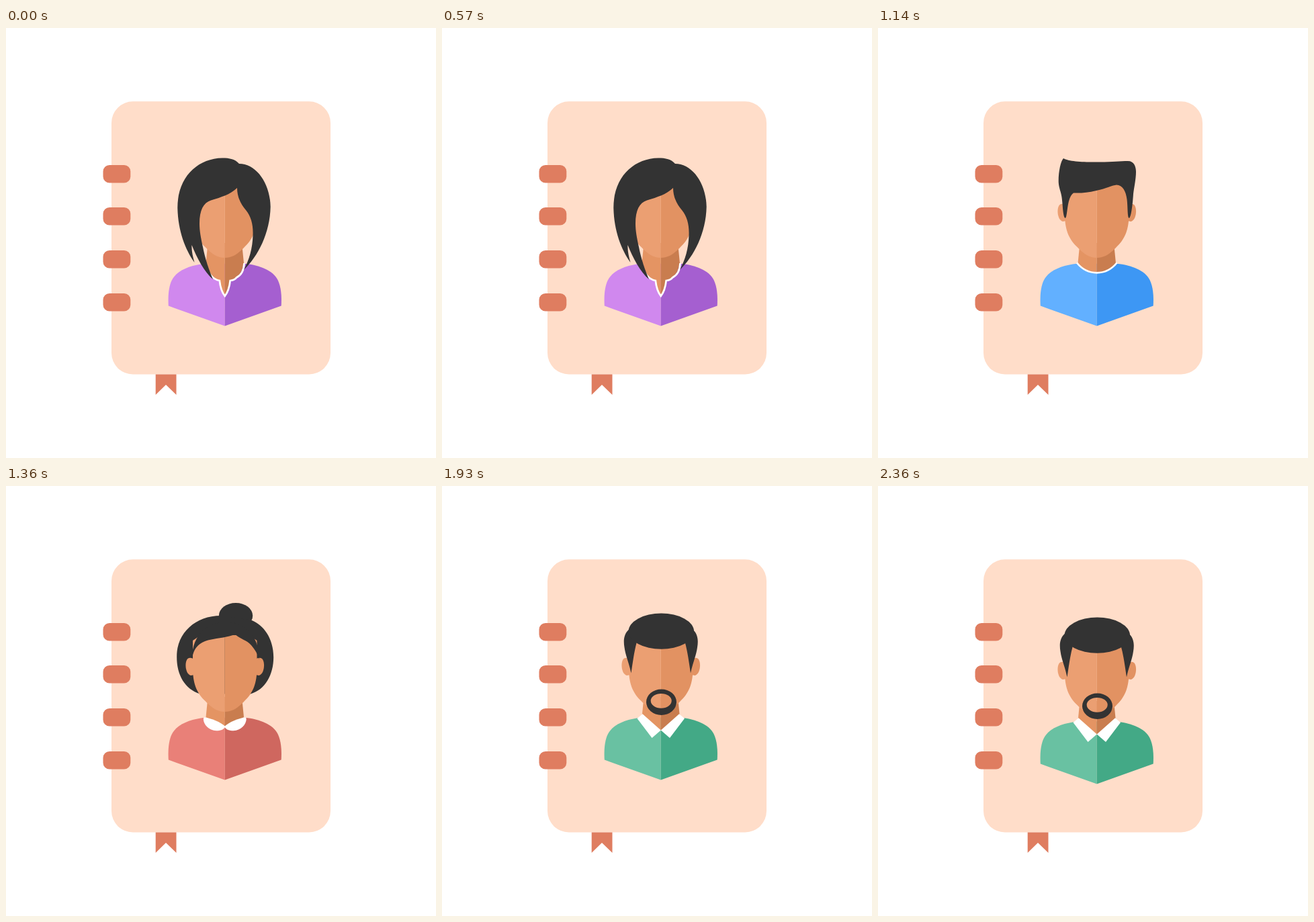
These frames come from a looping animation (640 by 640 pixels, 2.43 s). An HTML page:

```html
<!DOCTYPE html>
<html lang="en">
<head>
<meta charset="utf-8">
<title>Address book</title>
<style>
  html, body { margin: 0; width: 100%; height: 100%; overflow: hidden; background: #fff; }
  svg { display: block; width: 100%; height: 100%; }
</style>
</head>
<body>
<svg id="stage" viewBox="0 0 640 640"></svg>
<script>
const HAIR = '#333', ACCENT = '#df7d60';
const AXIS = 325.75;

const path = (d, fill, extra = '') => `<path d="${d}" fill="${fill}" ${extra}/>`;
const line = d => path(d, 'none', 'stroke="#fff" stroke-width="2.7" stroke-linecap="butt"');
const oval = (x, y, rx, ry, fill) =>
  `<ellipse cx="${x}" cy="${y}" rx="${rx}" ry="${ry}" fill="${fill}"/>`;

// A left half and its mirror image, each with its own colour
const pair = (d, left, right = left) =>
  path(d, left) + path(d, right, `transform="translate(${2 * AXIS}) scale(-1 1)"`);

const body = (left, right) => pair(
  `M${AXIS} 443.6L241.8 413.6C241 399 242 385 247 375C254 361 274 353 296 350.8H${AXIS}Z`, left, right);

const neck = end => pair(`M300.5 320L297.5 350${end}L${AXIS} 320Z`, '#e49463', '#c97d4f');

const ears = pair('M280 264C276 261 271 261 269 265C265.500 272 268 287 275.500 288L280 287Z', '#eb9f72', '#e29262');

const face = pair(
  `M278 236V281C279 303 285 315 297 326.500C307 337 315 342 ${AXIS} 342V228H290Z`, '#eb9f72', '#e29262');

const vNeck = 'M297.5 350Q302 373 317.800 376Q319.500 391 325.750 399Q332 391 333.700 376Q341 375 343 371.500Q354 366 354.500 350';

const bobWoman =
  body('#d088ee', '#a55fd0') +
  neck('Q302 373 317.800 376Q319.500 391 325.750 399') +
  line(vNeck) + face +
  path('M347 202C341 195 333 193.400 322 193.400C285 194 255 222 255.300 268C256 302 267 330 280.500 349' +
    'C278 340 276 332 276.500 323C284 342 295 363 308 374C302 360 296 342 293 326C290 312 288 302 288 291' +
    'C288 271 294 260 305 256.500C318 252.500 334 248 344 238C344 252 350 263 357 271' +
    'C365 281 368 293 367.500 308C367 328 362 345 354 360C375 340 393 305 393.700 266C393 230 372 202 347 202Z', HAIR);

const youngMan =
  body('#62b0ff', '#3d97f4') +
  neck(`Q308 364 ${AXIS} 364`) +
  line(`M296 349.500Q308 364.300 ${AXIS} 364.300T355.500 349.500`) +
  ears + face +
  path('M276 194C284 199 310 200 330 199.500C350 199.500 360 198 372 198C381 198 384 206 384 214' +
    'C384 225 381 238 380 247C379 262 377 280 374 283C371 283 372 268 370.500 255C369 243 364 233.500 355 233.500' +
    'C349 234 340 239 325 242C312 245 302 246 291 245.500C284 251 283 262 281.500 272C280.500 279 280 283 278.500 283' +
    'C275 280 275 262 273.500 252C272.500 244 269 238 268.700 229C268.500 214 272 198 276 194Z', HAIR);

const bunWoman =
  oval(342, 199, 25.2, 19, HAIR) +
  path('M322 199C283 198 254 224 254.200 260C254 287 266 308 289 315.500H364C386 309 398 287 398.200 261' +
    'C398 232 383 213 366 206Z', HAIR) +
  body('#e98078', '#cf675f') +
  neck(`L${AXIS} 365`) +
  pair(`M295.500 350.200C306 352 319 357 326.500 364C324 369 319 370.200 313 370.200C302 370 294 361 293.800 353Q294 350 295.500 350.200Z`, '#fff') +
  ears + face +
  path('M277 264C279 245 290 238 303 235C317 232 330 231 341 227C349 234 358 235 365 243' +
    'C372 251 375 258 376.500 264C379 190 275 190 277 264Z', HAIR);

const beardMan =
  body('#69c1a2', '#43a986') +
  neck(`L${AXIS} 370`) +
  pair(`M290.500 352L298.500 345.300L${AXIS} 369.500L312.500 381Z`, '#fff') +
  ears + face +
  pair('M279 219C270 226 270 237 271.500 246C273 258 278 268 281.500 284.500C284 268 286 252 290 238L300 225Z', HAIR) +
  oval(326.3, 222.2, 48.7, 26.6, HAIR) +
  path('M304 327.700a22.500 19.200 0 0 1 45 0a22.500 19.200 0 0 1-45 0Z' +
    'M310.700 325.800a15.500 10.900 0 0 0 31 0a15.500 10.900 0 0 0-31 0Z', HAIR, 'fill-rule="evenodd"');

const people = [bobWoman, youngMan, bunWoman, beardMan];

document.getElementById('stage').innerHTML =
  `<rect x="157" y="109.300" width="326" height="406.200" rx="32" fill="#ffddc9"/>` +
  [204, 267, 331, 395].map(y =>
    `<rect x="144.500" y="${y}" width="40.800" height="26.500" rx="9.500" fill="${ACCENT}"/>`).join('') +
  path('M222.700 515.500H253.500V546L238 531L222.700 546Z', ACCENT) +
  people.map(p => `<g class="person">${p}</g>`).join('');

const groups = document.querySelectorAll('.person');
const LOOP = 2430, FPS = 14, STEPS = 34;
const HOP = [0, -3.2, -6, -8, -10.4, -12.5, -14, -7.8, 0];  // slow rise, quick fall

function draw(now) {
  const time = now % LOOP;
  const step = Math.min(STEPS - 1, Math.floor((time + 5) * FPS / 1000));
  const half = step % 17;                       // two people share 17 steps
  const second = half > 8;
  const shown = 2 * Math.floor(step / 17) + second;
  const y = HOP[second ? half - 8 : half];
  groups.forEach((g, i) => {
    g.style.display = i === shown ? '' : 'none';
    g.setAttribute('transform', `translate(0 ${y})`);
  });
}

const start = performance.now();
function tick() {
  draw(performance.now() - start);
  requestAnimationFrame(tick);
}
tick();
</script>
</body>
</html>
```
